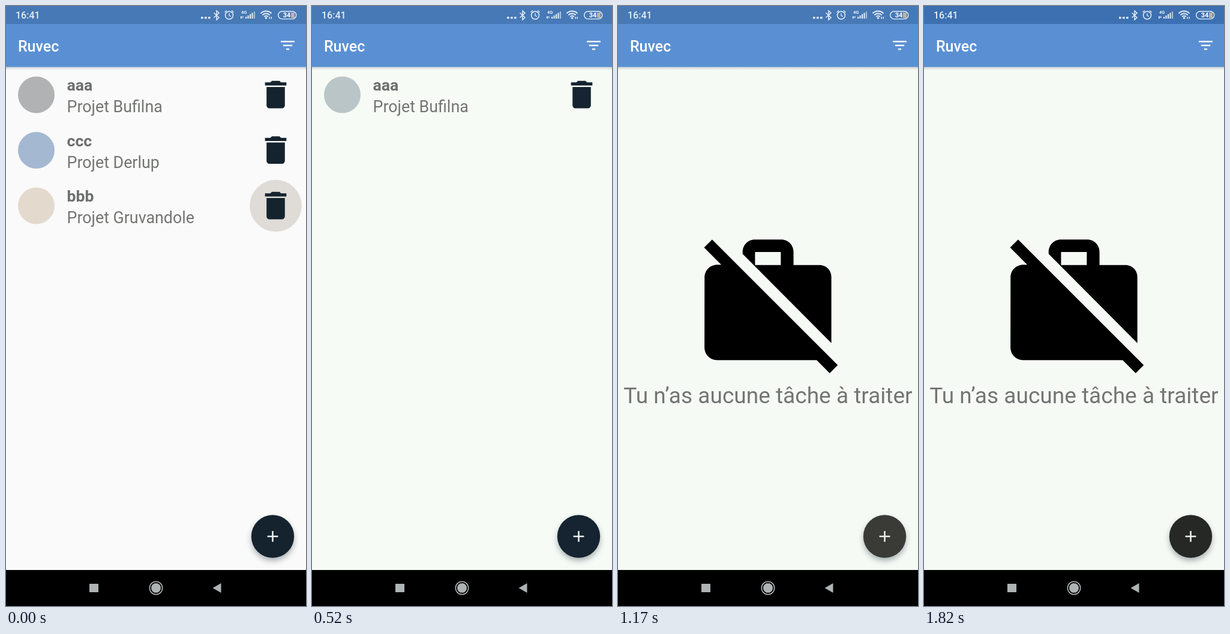
These frames come from a looping animation (500 by 1000 pixels, 1.95 s). An HTML page with a canvas:

```html
<!DOCTYPE html>
<html lang="fr">
<head>
<meta charset="utf-8">
<title>Tâches</title>
<style>
  html, body { margin: 0; width: 100%; height: 100%; overflow: hidden; background: #000; }
  canvas { display: block; width: 500px; height: 1000px; }
</style>
</head>
<body>
<canvas id="stage"></canvas>
<script>
const LOOP = 1950;
const FONT = 'Roboto, "Noto Sans", sans-serif';
const ROW_H = 92.5;

const TASKS = [
  ['aaa', 'Projet Bufilna'],
  ['ccc', 'Projet Derlup'],
  ['bbb', 'Projet Gruvandole']
];

// One entry per screen state; dots has one colour per remaining task
const STATES = [
  { at: 0, bg: '#f9faf9', dots: ['#b1b2b4', '#a4b8d2', '#e4d9cd'], bin: '#15232e', fab: '#15232e', ripple: '#dfdcd8' },
  { at: 130, bg: '#f5fcf4', dots: ['#aeb5b0', '#b4c6d4'], bin: '#171a1b', fab: '#2d3234' },
  { at: 390, bg: '#f6fbf5', dots: ['#b1b8b2', '#a3c1e0'], bin: '#15191a', fab: '#2d3133', ripple: '#d9ddd8' },
  { at: 520, bg: '#f6fbf6', dots: ['#b9c5c6'], bin: '#152430', fab: '#152430' },
  { at: 1040, bg: '#f6fbf6', dots: ['#b1bebc'], bin: '#0b1118', fab: '#2c3130', ripple: '#d6dddb' },
  { at: 1170, bg: '#f5faf5', dots: [], fab: '#3a3b37' },
  { at: 1820, bg: '#f6faf5', dots: [], fab: '#262825', status: '#3c70b1' }
];

const BIN = new Path2D('M6 19c0 1.1.9 2 2 2h8c1.1 0 2-.9 2-2V7H6v12zM19 4h-3.5l-1-1h-5l-1 1H5v2h14V4z');
const FILTER = new Path2D('M10 18h4v-2h-4v2zM3 6v2h18V6H3zm3 7h12v-2H6v2z');
const PLUS = new Path2D('M19 13h-6v6h-2v-6H5v-2h6V5h2v6h6v2z');
const NO_WORK = new Path2D('M23 21.74l-1.46-1.46L7.21 5.95 3.25 1.99 1.99 3.25l2.7 2.7h-.64c-1.11 0-1.99.89-1.99 2l-.01 11c0 1.11.89 2 2 2h15.64L21.74 23 23 21.74zM22 7.95c.05-1.11-.84-2-1.95-1.95h-4V3.95c0-1.11-.89-2-2-1.95h-4c-1.11-.05-2 .84-2 1.95v.32l13.95 14V7.95zM14.05 6H10V3.95h4.05V6z');

const canvas = document.getElementById('stage');
const ctx = canvas.getContext('2d');
const ratio = window.devicePixelRatio || 1;
canvas.width = 500 * ratio;
canvas.height = 1000 * ratio;
ctx.scale(ratio, ratio);

function rect(x, y, w, h, color) {
  ctx.fillStyle = color;
  ctx.fillRect(x, y, w, h);
}

function disc(x, y, r, color) {
  ctx.fillStyle = color;
  ctx.beginPath();
  ctx.arc(x, y, r, 0, Math.PI * 2);
  ctx.fill();
}

function arc(x, y, r, width, color, from = 0, to = Math.PI * 2) {
  ctx.strokeStyle = color;
  ctx.lineWidth = width;
  ctx.beginPath();
  ctx.arc(x, y, r, from, to);
  ctx.stroke();
}

function line(points, width, color) {
  ctx.strokeStyle = color;
  ctx.lineWidth = width;
  ctx.beginPath();
  points.forEach(([x, y]) => ctx.lineTo(x, y));
  ctx.stroke();
}

function text(str, x, y, size, weight, color, align = 'left') {
  ctx.font = `${weight} ${size}px ${FONT}`;
  ctx.textAlign = align;
  ctx.fillStyle = color;
  ctx.fillText(str, x, y);
}

// Draws a 24-unit icon centred on x, y
function icon(path, x, y, scale, color) {
  ctx.save();
  ctx.translate(x - 12 * scale, y - 12 * scale);
  ctx.scale(scale, scale);
  ctx.fillStyle = color;
  ctx.fill(path);
  ctx.restore();
}

function statusBar(color = '#4679b6') {
  const ink = '#e8eef6';
  rect(0, 0, 500, 30, color);
  text('16:41', 16, 21, 16, 500, ink);
  for (let i = 0; i < 3; i++) rect(325 + 6 * i, 18, 3.6, 3.2, ink);

  // Bluetooth
  line([[346.5, 11.5], [355, 19.3], [351, 23], [351, 8], [355, 11.7], [346.5, 19.3]], 1.5, ink);

  // Alarm clock
  arc(372, 15.5, 6.5, 1.5, ink);
  line([[372, 12], [372, 16], [375, 17.5]], 1.3, ink);
  line([[364.5, 10.5], [368, 7.5]], 1.5, ink);
  line([[376, 7.5], [379.5, 10.5]], 1.5, ink);

  // Mobile signal
  text('4G', 392, 13, 7.5, 700, ink);
  rect(391, 17, 1.8, 4, ink);
  rect(394, 17, 1.4, 3, ink);
  for (let i = 0; i < 5; i++) {
    const h = 3 + 2.2 * i;
    rect(399 + 3.5 * i, 21 - h, 2.1, h, i < 4 ? ink : '#a9c0dc');
  }

  // Wi-Fi
  for (const r of [4.5, 8.5, 12.5]) {
    arc(433.5, 21, r, 1.9, ink, -Math.PI * 0.76, -Math.PI * 0.24);
  }
  disc(433.5, 20, 1.8, ink);
  rect(438.5, 18, 1.4, 3.5, ink);
  rect(441.5, 18, 1.4, 3.5, ink);

  // Battery
  rect(475, 11, 6, 9, '#b9b4a5');
  ctx.strokeStyle = ink;
  ctx.lineWidth = 1.4;
  ctx.beginPath();
  ctx.roundRect(453.7, 9, 30, 12.6, 6.3);
  ctx.stroke();
  text('34', 468, 19.3, 11, 700, '#fff', 'center');
}

function appBar() {
  const shade = ctx.createLinearGradient(0, 101, 0, 107);
  shade.addColorStop(0, 'rgba(70,80,100,.25)');
  shade.addColorStop(1, 'rgba(70,80,100,0)');
  rect(0, 101, 500, 6, shade);
  rect(0, 30, 500, 71.6, '#5a90d3');
  text('Ruvec', 20, 76, 25, 500, '#fff');
  icon(FILTER, 469.5, 65.7, 1.273, '#f4f8fc');
}

function taskRow(i, s) {
  const y = 148 + ROW_H * i;
  const [name, project] = TASKS[i];
  disc(50.5, y, 30.5, s.dots[i]);
  text(name, 101.5, y - 7, 26.6, 700, '#6d6f6e');
  text(project, 101.5, y + 29, 26.8, 400, '#737573');
  if (s.ripple && i === s.dots.length - 1) disc(449.5, y, 43.3, s.ripple);
  icon(BIN, 449.5, y - 0.3, 2.545, s.bin);
}

function emptyView() {
  icon(NO_WORK, 249.6, 495.3, 10.6, '#000');
  text('Tu n’as aucune tâche à traiter', 250, 662, 37.05, 400, '#737573', 'center');
}

function addButton(color) {
  ctx.save();
  ctx.shadowColor = 'rgba(40,55,65,.38)';
  ctx.shadowBlur = 10 * ratio;
  ctx.shadowOffsetY = 5 * ratio;
  disc(444.5, 884, 35.7, color);
  ctx.restore();
  icon(PLUS, 444.5, 884, 1.273, '#eef1ef');
}

function navBar() {
  const ink = '#aeb4b3';
  rect(0, 940, 500, 60, '#000');
  rect(139, 963, 15, 14, ink);
  arc(250, 970, 10.7, 1.6, ink);
  disc(250, 970, 8, ink);
  ctx.fillStyle = ink;
  ctx.beginPath();
  ctx.moveTo(344.5, 970);
  ctx.lineTo(358.5, 962);
  ctx.lineTo(358.5, 978);
  ctx.fill();
}

function draw(t) {
  const s = STATES.findLast(state => state.at <= t);
  rect(0, 0, 500, 1000, s.bg);
  s.dots.forEach((_, i) => taskRow(i, s));
  if (!s.dots.length) emptyView();
  addButton(s.fab);
  statusBar(s.status);
  appBar();
  navBar();
}

const start = performance.now();
function tick() {
  draw((performance.now() - start) % LOOP);
  requestAnimationFrame(tick);
}
tick();
</script>
</body>
</html>
```
